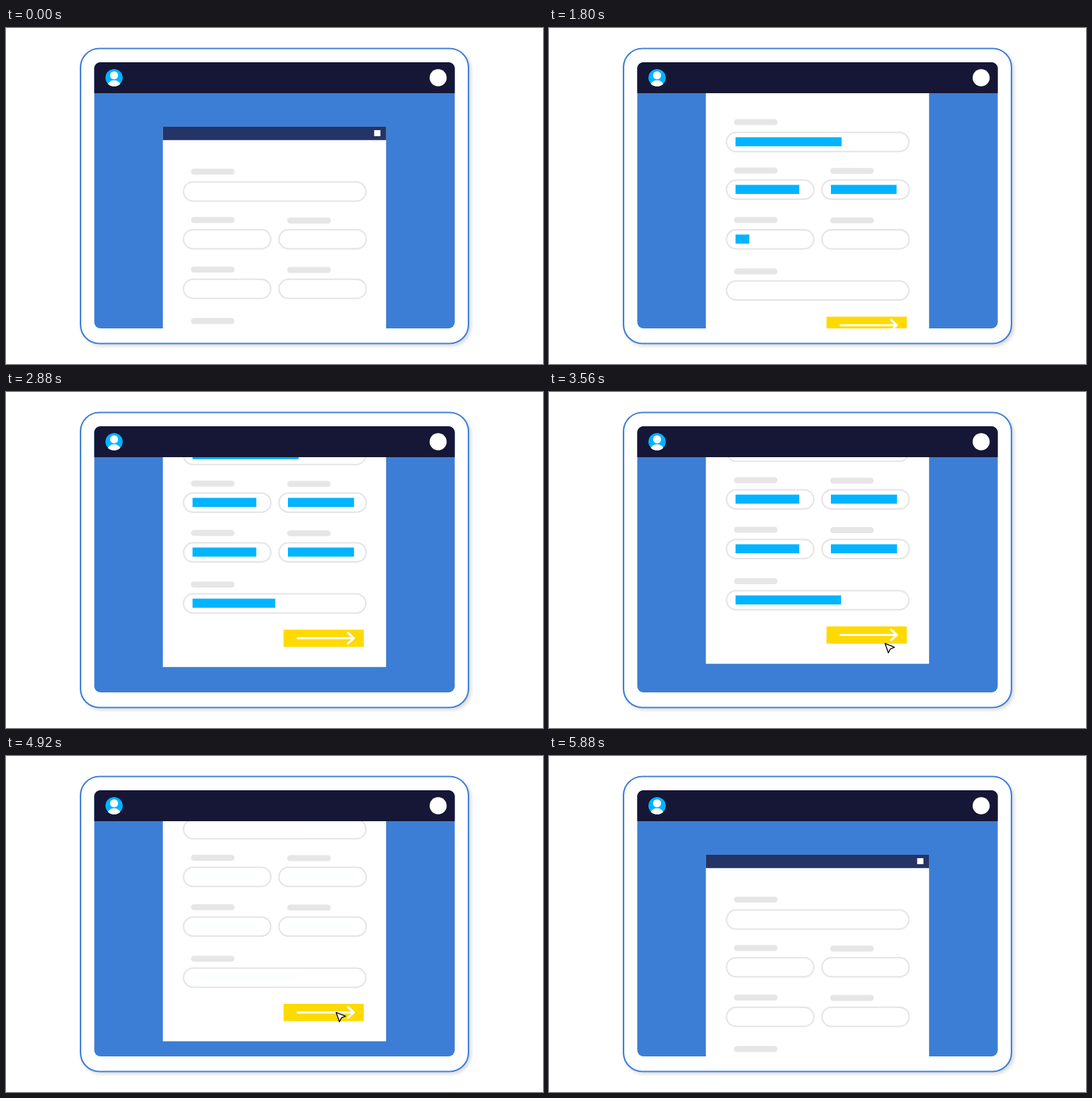
Animation, 800 px wide and 500 px high, one loop 6 s. Source, as an HTML page:

```html
<!DOCTYPE html>
<html lang="en">
<head>
<meta charset="utf-8">
<title>Form filling</title>
<style>
  html, body { margin: 0; width: 100%; height: 100%; overflow: hidden; background: #fff; }
  svg { display: block; width: 800px; height: 500px; }
  .label { fill: #e6e6e6; }
  .field { fill: #fff; stroke: #e6e6e6; stroke-width: 2.3; }
  .value { fill: #00b4ff; }
  .arrow { fill: none; stroke: #fff; stroke-width: 3.2; stroke-linecap: round; stroke-linejoin: round; }
</style>
</head>
<body>
<svg viewBox="0 0 800 500">
  <defs>
    <filter id="soft" x="-5%" y="-5%" width="110%" height="110%">
      <feDropShadow dx="3" dy="3" stdDeviation="2.5" flood-color="#000" flood-opacity=".14"/>
    </filter>
    <clipPath id="screen"><rect x="131.5" y="51" width="537" height="396" rx="9"/></clipPath>
    <clipPath id="view"><rect x="131.5" y="97" width="537" height="350"/></clipPath>
    <clipPath id="face"><circle cx="161" cy="74" r="13"/></clipPath>
  </defs>

  <rect x="111" y="30.5" width="578" height="439" rx="28" fill="#fff" stroke="#3c7fd6" stroke-width="2.2" filter="url(#soft)"/>

  <g clip-path="url(#screen)">
    <rect x="131" y="51" width="538" height="397" fill="#3c7ed5"/>
    <rect x="131" y="51" width="538" height="46" fill="#161637"/>
    <g clip-path="url(#face)">
      <circle cx="161" cy="74" r="13" fill="#00b4ff"/>
      <circle cx="161" cy="70.4" r="6" fill="#fff"/>
      <ellipse cx="161" cy="86" rx="9.8" ry="8.2" fill="#fff"/>
    </g>
    <circle cx="643.8" cy="74" r="12.7" fill="#fff"/>

    <g clip-path="url(#view)">
      <g id="page">
        <rect x="234.5" y="148" width="332.7" height="411.8" fill="#000" opacity=".12"/>
        <rect x="233.7" y="147" width="332.6" height="412" fill="#fff"/>
        <rect x="233.7" y="147" width="332.6" height="19.8" fill="#243466"/>
        <rect x="548.5" y="152" width="9.3" height="9" fill="#fff"/>
        <g id="fields"></g>
        <rect x="413.5" y="503.3" width="119.5" height="25.7" fill="#ffda00"/>
        <path class="arrow" d="M434.5 516H518M509.7 508.2l8.5 7.8l-8.5 7.8"/>
        <path id="cursor" d="M0 0L14 5.6L7.9 8.1L4.9 14Z" fill="#fff" stroke="#000" stroke-width="1.4" stroke-linejoin="round"/>
      </g>
    </g>
  </g>
</svg>
<script>
  const LOOP = 6000, TICK = 40, SCROLL = 154.5, FILL = 800;
  const $ = id => document.getElementById(id);

  // x, top, width, label y, value width, start of filling
  const rows = [
    [264.5, 229.2, 271.6, 209.3, 158, 160],
    [264.5, 300.1, 130, 281.3, 95, 520],
    [406.6, 300.1, 130, 282, 98.5, 1040],
    [264.5, 374, 130, 355, 95, 1560],
    [406.6, 374, 130, 355.5, 98.5, 1940],
    [264.5, 450.1, 271.6, 431.6, 157.2, 2320]
  ];

  function rect(cls, x, y, width, height, rx = 0) {
    const el = document.createElementNS('http://www.w3.org/2000/svg', 'rect');
    const attrs = { class: cls, x, y, width, height, rx };
    for (const key in attrs) el.setAttribute(key, attrs[key]);
    return $('fields').appendChild(el);
  }

  const values = rows.map(([x, y, w, labelY, full, start]) => {
    rect('label', x + (x > 400 ? 12.3 : 11), labelY, 65, 9, 4.5);
    rect('field', x, y, w, 28.4, 14.2);
    return { el: rect('value', x + 13.4, y + 7.1, 0, 13.5), full, start };
  });

  const ease = (t, from, to) => {
    const p = Math.min(1, Math.max(0, (t - from) / (to - from)));
    return p * p * (3 - 2 * p);
  };

  function draw(t) {
    const scroll = SCROLL * (ease(t, 520, 3160) - ease(t, 4640, 5880));
    $('page').setAttribute('transform', `translate(0 ${-scroll})`);

    for (const { el, full, start } of values) {
      el.setAttribute('width', full * ease(t, start, start + FILL));
    }
    $('fields').style.setProperty('--fade', 0);
    const opacity = 1 - ease(t, 4240, 4960);
    values.forEach(v => v.el.setAttribute('opacity', opacity));

    const away = 1 - ease(t, 2960, 3840);
    const press = 1 - 0.15 * (ease(t, 4040, 4140) - ease(t, 4140, 4240));
    $('cursor').setAttribute('transform',
      `translate(${491.8 + 37 * away} ${516 + 53 * away}) scale(${press})`);
    $('cursor').setAttribute('opacity', ease(t, 2960, 3160));
  }

  const begin = performance.now();
  function frame() {
    const t = (performance.now() - begin) % LOOP;
    draw(Math.floor(t / TICK) * TICK);
    requestAnimationFrame(frame);
  }
  frame();
</script>
</body>
</html>
```
